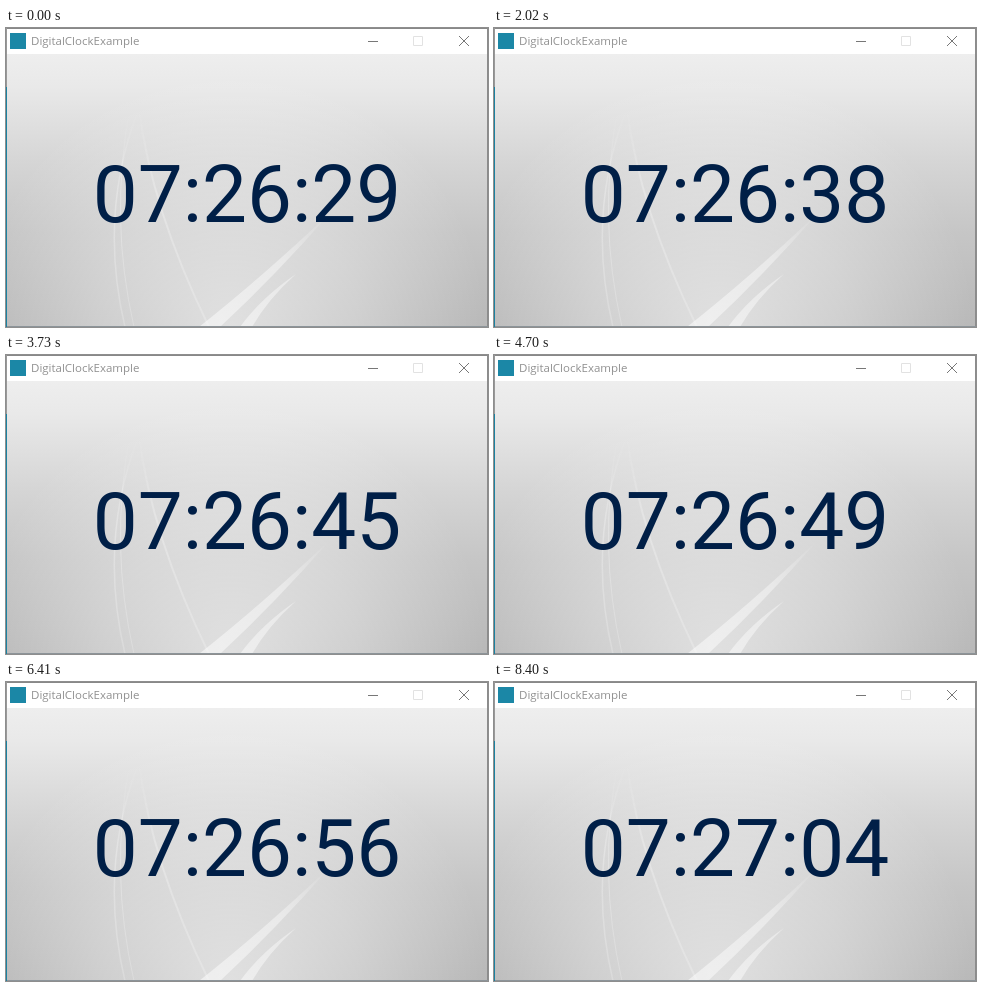
Animation, 482 px wide and 299 px high, one loop 8480 ms. Source, as an HTML page with a canvas:

```html
<!DOCTYPE html>
<html lang="en">
<head>
<meta charset="utf-8">
<title>DigitalClockExample</title>
<style>
html, body { margin: 0; width: 100%; height: 100%; overflow: hidden; background: #fff; }
canvas { display: block; }
</style>
</head>
<body>
<canvas id="stage" width="482" height="299"></canvas>
<script>
const W = 482, H = 299, LOOP = 8480;
const START = 7 * 3600 + 26 * 60 + 29;
const canvas = document.getElementById('stage');
const ctx = canvas.getContext('2d');

// Bursts of ticks: first time, number of ticks, interval in ms.
const bursts = [
  [30, 2, 230], [540, 3, 230], [1280, 3, 230], [2020, 4, 230],
  [2990, 2, 230], [3500, 4, 230], [4470, 2, 230], [4980, 3, 230],
  [5720, 4, 230], [6690, 3, 230], [7430, 5, 242.5]
];
const ticks = bursts.flatMap(([t, n, gap]) => Array.from({ length: n }, (_, i) => t + i * gap));

function rect(g, x, y, w, h, color) {
  g.fillStyle = color;
  g.fillRect(x, y, w, h);
}

function fade(gradient, stops) {
  for (const [at, color] of stops) gradient.addColorStop(at, color);
  return gradient;
}

function strokePath(g, path, color, width = 1) {
  g.strokeStyle = color;
  g.lineWidth = width;
  g.stroke(new Path2D(path));
}

function drawBackdrop(g) {
  rect(g, 0, 26, W, H - 26, fade(g.createLinearGradient(0, 26, 0, H), [
    [0, '#eeeeee'], [0.12, '#e9e9e9'], [0.4, '#d5d5d5'], [0.65, '#c6c6c6'], [1, '#b8b8b8']
  ]));
  rect(g, 0, 26, W, H - 26, fade(g.createRadialGradient(225, H, 0, 225, H, 255), [
    [0, 'rgba(255,255,255,.56)'], [0.5, 'rgba(255,255,255,.32)'], [1, 'rgba(255,255,255,0)']
  ]));

  // Soft beams of light
  const beam = fade(g.createLinearGradient(205, H, 325, 185), [
    [0, 'rgba(255,255,255,.5)'], [0.6, 'rgba(255,255,255,.4)'], [1, 'rgba(255,255,255,0)']
  ]);
  g.fillStyle = beam;
  g.fill(new Path2D('M193 299 Q255 250 325 184 Q270 247 214 299Z'));
  g.fill(new Path2D('M234 299 Q255 270 290 246 Q262 271 246 299Z'));

  const arc = fade(g.createLinearGradient(0, 80, 0, H), [
    [0, 'rgba(255,255,255,0)'], [0.4, 'rgba(255,255,255,.28)'], [1, 'rgba(255,255,255,.2)']
  ]);
  strokePath(g, 'M133 80 Q92 185 119 299', arc, 1.5);
  strokePath(g, 'M124 80 Q103 190 128 299', arc, 1);
  strokePath(g, 'M133 80 Q145 180 203 299', arc, 2);
}

function drawWindow(g) {
  rect(g, 0, 0, W, 26, '#ffffff');
  drawBackdrop(g);

  rect(g, 4, 5, 16, 16, '#1b87a6');
  g.fillStyle = '#919191';
  g.font = '11.5px "Open Sans", "Noto Sans", sans-serif';
  g.fillText('DigitalClockExample', 25, 17);

  rect(g, 362, 13, 10, 1, '#777777');
  strokePath(g, 'M407.5 8.5h9v9h-9z', '#e2e2e2');
  strokePath(g, 'M453 8l10 10M463 8l-10 10', '#777777');

  rect(g, 0, 0, W, 1, '#888888');
  rect(g, 0, 0, 1, 59, '#999999');
  rect(g, W - 1, 0, 1, H, '#8c8c8c');
  rect(g, 0, H - 1, W, 1, '#8c9499');
  rect(g, 0, 59, 1, H - 59, '#1b82a1');
}

const scene = document.createElement('canvas');
scene.width = W;
scene.height = H;
drawWindow(scene.getContext('2d'));

const pad = n => String(Math.floor(n)).padStart(2, '0');

function clockText(ms) {
  const s = START + ticks.filter(t => t <= ms).length;
  return [s / 3600, s / 60 % 60, s % 60].map(pad).join(':');
}

const origin = performance.now();

function draw() {
  ctx.drawImage(scene, 0, 0);
  ctx.font = '80px Roboto, sans-serif';
  ctx.fontKerning = 'none';
  ctx.textAlign = 'center';
  ctx.fillStyle = '#001f47';
  ctx.fillText(clockText((performance.now() - origin) % LOOP), 241, 194);
  requestAnimationFrame(draw);
}
draw();
</script>
</body>
</html>
```
